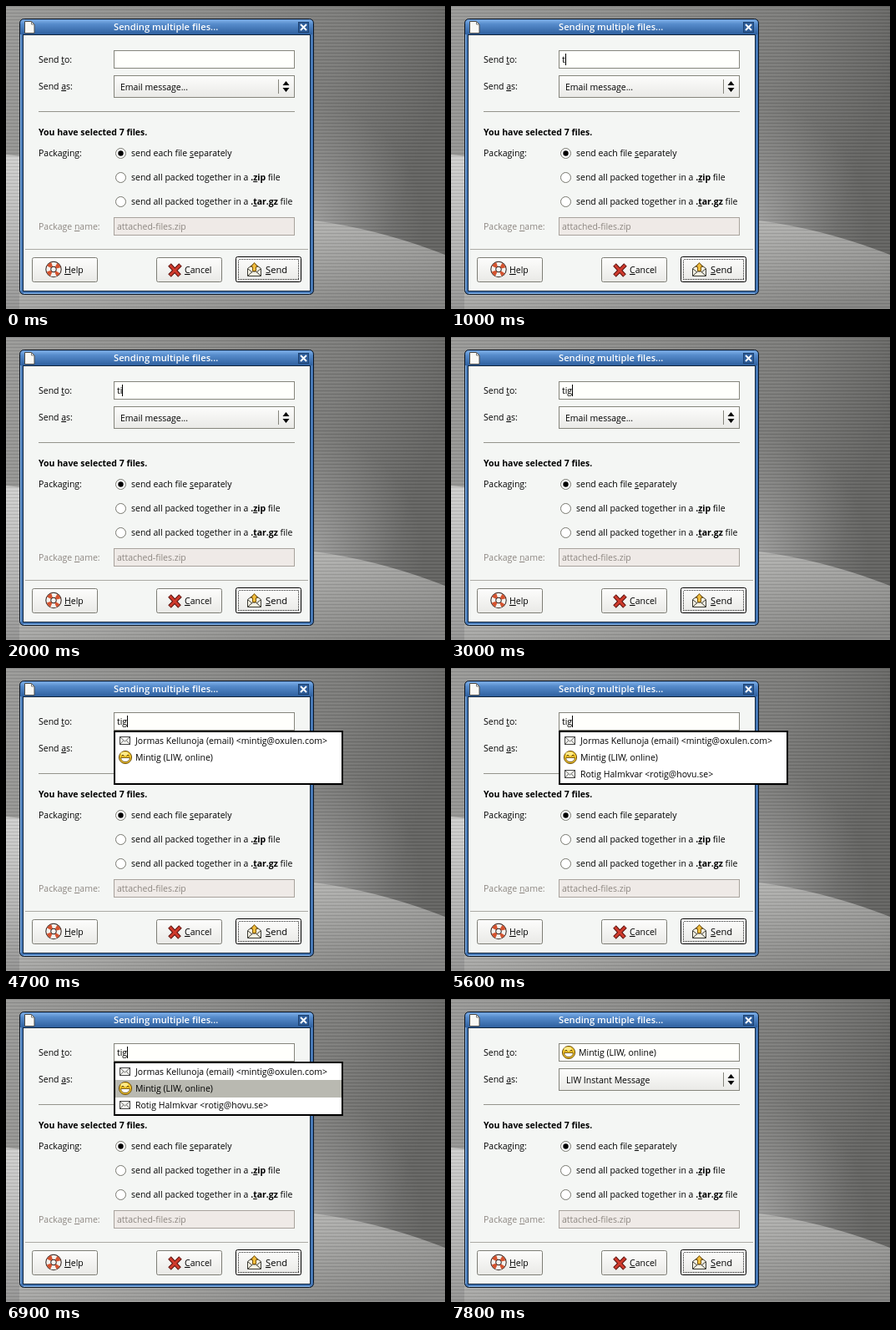
Recreate the animation shown at these times as an HTML page. Size 526 by 363 pixels, loop 8 s.

```html
<!DOCTYPE html>
<html lang="en">
<head>
<meta charset="utf-8">
<title>Sending multiple files</title>
<style>
  html, body { margin: 0; width: 100%; height: 100%; overflow: hidden; background: #777; }
  svg { display: block; width: 526px; height: 363px; font: 10.5px "Open Sans", sans-serif; }
  text { fill: #000; white-space: pre; }
  u, .u { text-decoration: underline; }
  .b { font-weight: 700; }
  .box { stroke: #85857c; fill: #fffffc; }
  .off { fill: #8c8680; }
  rect, .crisp { shape-rendering: crispEdges; }
  .round { shape-rendering: auto; }
</style>
</head>
<body>
<svg viewBox="0 0 526 363">
  <defs>
    <linearGradient id="sky" x2="1" y2=".25">
      <stop offset="0" stop-color="#9b9b99"/><stop offset=".45" stop-color="#8b8b89"/>
      <stop offset=".75" stop-color="#7c7c7a"/><stop offset="1" stop-color="#656563"/>
    </linearGradient>
    <linearGradient id="hill" gradientUnits="userSpaceOnUse" x1="280" y1="240" x2="310" y2="390">
      <stop offset="0" stop-color="#c2c2c0"/><stop offset="1" stop-color="#858583"/>
    </linearGradient>
    <radialGradient id="glow" gradientUnits="userSpaceOnUse" cx="350" cy="262" r="150">
      <stop offset="0" stop-color="#ccc" stop-opacity=".55"/><stop offset="1" stop-color="#aaa" stop-opacity="0"/>
    </radialGradient>
    <linearGradient id="shade" x2="0" y2="1">
      <stop offset="0" stop-color="#ddd" stop-opacity=".5"/><stop offset="1" stop-color="#888" stop-opacity=".6"/>
    </linearGradient>
    <linearGradient id="blue" x2="0" y2="1">
      <stop offset="0" stop-color="#7fb0e8"/><stop offset=".3" stop-color="#568bcb"/><stop offset="1" stop-color="#2f609f"/>
    </linearGradient>
    <linearGradient id="face" x2="0" y2="1">
      <stop offset="0" stop-color="#fdfdfc"/><stop offset="1" stop-color="#e9e9e6"/>
    </linearGradient>
    <pattern id="lines" width="4" height="4" patternUnits="userSpaceOnUse">
      <rect width="4" height="1" fill="#000" opacity=".1"/>
      <rect y="2" width="4" height="1" fill="#fff" opacity=".05"/>
    </pattern>
    <g id="mail" class="crisp" fill="#f4f4f0" stroke="#444">
      <rect x=".5" y=".5" width="12" height="9"/>
      <path class="round" d="M1 1 6.5 6 12 1M1 9 4.5 5M12 9 8.5 5" fill="none" stroke-width=".8"/>
    </g>
    <g id="grin">
      <circle r="7.6" fill="#f5c72c" stroke="#6b4d0b"/>
      <ellipse cx="-1" cy="-4.2" rx="4.5" ry="2.2" fill="#ffe98a"/>
      <path d="M-4.5-1.5q1.5-2.5 3 0M1.5-1.5q1.5-2.5 3 0" fill="none" stroke="#4a3206"/>
      <path d="M-5.5.5h11q-.8 5-5.5 5t-5.5-5Z" fill="#fff" stroke="#6b4d0b" stroke-width=".9"/>
    </g>
    <g id="radio">
      <circle r="6" fill="#fff" stroke="#77776f"/>
    </g>
  </defs>

  <!-- desktop -->
  <rect width="526" height="363" fill="url(#sky)"/>
  <rect width="526" height="363" fill="url(#glow)"/>
  <path d="M0 178Q90 186 200 221T369 257Q450 268 526 298V363H0Z" fill="url(#hill)"/>
  <rect y="180" width="16" height="183" fill="url(#shade)"/>
  <rect width="526" height="363" fill="url(#lines)"/>

  <!-- window frame -->
  <rect class="round" x="16.5" y="15.5" width="352" height="330" rx="5" fill="#4678b6" stroke="#0c1420"/>
  <path d="M17.500 34V20q0-3.500 3.500-3.500H364q3.500 0 3.500 3.500V34Z" fill="url(#blue)"/>
  <path class="crisp" d="M17.500 34V341M21 344.500H364" stroke="#8fbcec" fill="none"/>
  <rect x="20.500" y="34.500" width="344" height="307" fill="#f4f6f4" stroke="#10243c"/>
  <path d="M22.500 18.500h8l3.500 3.500v10.500H22.500Z" fill="#f8f8f4" stroke="#4b4b48"/>
  <path d="M30.500 18.500v3.500h3.500" fill="none" stroke="#777"/>
  <rect x="350.500" y="19.500" width="12" height="12" fill="#2d5c99" stroke="#1d416f"/>
  <path d="m353 22 7 7m0-7-7 7" stroke="#fff" stroke-width="2"/>
  <text x="129" y="29" font-size="11.2" font-weight="600" style="fill:#fff">Sending multiple files...</text>

  <!-- form -->
  <text x="39" y="68">Send <tspan class="u">t</tspan>o:</text>
  <rect class="box" x="129.500" y="53.500" width="216" height="21"/>
  <text x="39" y="100">Send <tspan class="u">a</tspan>s:</text>
  <rect class="box" x="129.500" y="83.500" width="216" height="26" style="fill:url(#face)"/>
  <path class="crisp" d="M326.500 88V105" stroke="#85857c"/>
  <path d="m335.500 90 4 5h-8ZM335.500 103l4-5h-8Z"/>
  <text id="method" y="101"></text>
  <path class="crisp" d="M39 126.500H346" stroke="#94948c"/>
  <text class="b" x="39" y="155">You have selected 7 files.</text>
  <text x="39" y="180">Packaging:</text>
  <use href="#radio" x="137.500" y="176.500"/><circle cx="137.500" cy="176.500" r="3.200"/>
  <use href="#radio" x="137.500" y="205.500"/>
  <use href="#radio" x="137.500" y="234.500"/>
  <text x="150" y="180">send each file <tspan class="u">s</tspan>eparately</text>
  <text x="150" y="209">send all packed together in a <tspan class="b">.<tspan class="u">z</tspan>ip</tspan> file</text>
  <text x="150" y="238">send all packed together in a <tspan class="b">.<tspan class="u">t</tspan>ar.gz</tspan> file</text>
  <text class="off" x="39" y="268">Package <tspan class="u">n</tspan>ame:</text>
  <rect x="129.500" y="253.500" width="216" height="21" fill="#efeae7" stroke="#a8a29c"/>
  <text class="off" x="133" y="268">attached-files.zip</text>
  <path class="crisp" d="M23 291.500H362" stroke="#aaaaa4"/>

  <!-- buttons -->
  <g fill="url(#face)" stroke="#7d7d75">
    <rect class="round" x="31.500" y="301.500" width="78" height="29" rx="2"/>
    <rect class="round" x="180.500" y="301.500" width="78" height="29" rx="2"/>
    <rect class="round" x="275.500" y="300.500" width="78" height="30" rx="2" stroke="#000"/>
    <rect x="278.500" y="303.500" width="72" height="24" fill="none" stroke="#222" stroke-dasharray="1 1"/>
  </g>
  <g fill="none">
    <circle cx="57" cy="315.500" r="6.200" stroke="#2a1a16" stroke-width="7"/>
    <circle cx="57" cy="315.500" r="6.200" stroke="#f4f2ee" stroke-width="5"/>
    <circle cx="57" cy="315.500" r="6.200" stroke="#d4532f" stroke-width="5" stroke-dasharray="4.870" stroke-dashoffset="2.430" transform="rotate(45 57 315.500)"/>
  </g>
  <path d="m196 310 12 13m1-13-13 13" stroke="#5b1410" stroke-width="5"/>
  <path d="m196.500 310.500 11 12m1-12-12 12" stroke="#cf3a2c" stroke-width="3"/>
  <g stroke="#3a3a34">
    <path d="M289.500 314.500l8-6 8 6v9h-16Z" fill="#f3f0e2"/>
    <path d="m290 323 5.500-5h4l5.500 5M290 315l5 4M305 315l-5 4" fill="none"/>
    <path d="m297.500 307.500 4 5h-2v5h-4v-5h-2Z" fill="#f2bd3c" stroke="#7b5710"/>
  </g>
  <text x="70" y="320"><tspan class="u">H</tspan>elp</text>
  <text x="214" y="320"><tspan class="u">C</tspan>ancel</text>
  <text x="311" y="320" font-size="11.200"><tspan class="u">S</tspan>end</text>

  <!-- recipient and completions -->
  <text id="typed" x="133" y="68"></text>
  <path id="caret" class="crisp" d="M.5 57V71" stroke="#000"/>
  <g id="chosen">
    <use href="#grin" x="141" y="64"/>
    <text x="153" y="68">Mintig (LIW, online)</text>
  </g>
  <g id="popup">
    <rect x="130" y="76" width="273" height="63" fill="#fff" stroke="#000" stroke-width="2"/>
    <rect id="highlight" x="131" y="97" width="271" height="21" fill="#b9b9b1"/>
    <g class="row"><use href="#mail" x="136" y="82"/><text x="155" y="91">Jormas Kellunoja (email) &lt;mintig@oxulen.com&gt;</text></g>
    <g class="row"><use href="#grin" x="143" y="107"/><text x="155" y="111">Mintig (LIW, online)</text></g>
    <g class="row"><use href="#mail" x="136" y="122"/><text x="155" y="131">Rotig Halmkvar &lt;rotig@hovu.se&gt;</text></g>
  </g>
</svg>
<script>
  const LOOP = 8000;
  const KEYS = [1000, 2000, 3000];
  const ROWS = [3800, 4700, 5600];
  const HIGHLIGHT = 6900, CHOOSE = 7800;

  const el = id => document.getElementById(id);
  const rows = document.querySelectorAll(".row");
  const show = (node, on) => node.style.display = on ? "" : "none";
  const passed = (times, t) => times.filter(time => t >= time).length;

  function draw(t) {
    const done = t >= CHOOSE;
    const typed = done ? "" : "tig".slice(0, passed(KEYS, t));
    el("typed").textContent = typed;
    show(el("caret"), typed);
    const end = 133 + Math.round(el("typed").getComputedTextLength());
    el("caret").setAttribute("transform", `translate(${end})`);

    const found = passed(ROWS, t);
    show(el("popup"), found && !done);
    rows.forEach((row, i) => show(row, i < found));
    show(el("highlight"), t >= HIGHLIGHT);

    show(el("chosen"), done);
    el("method").textContent = done ? "LIW Instant Message" : "Email message...";
    el("method").setAttribute("x", done ? 138 : 137);
  }

  const start = performance.now();
  function tick() {
    draw((performance.now() - start) % LOOP);
    requestAnimationFrame(tick);
  }
  tick();
</script>
</body>
</html>
```
